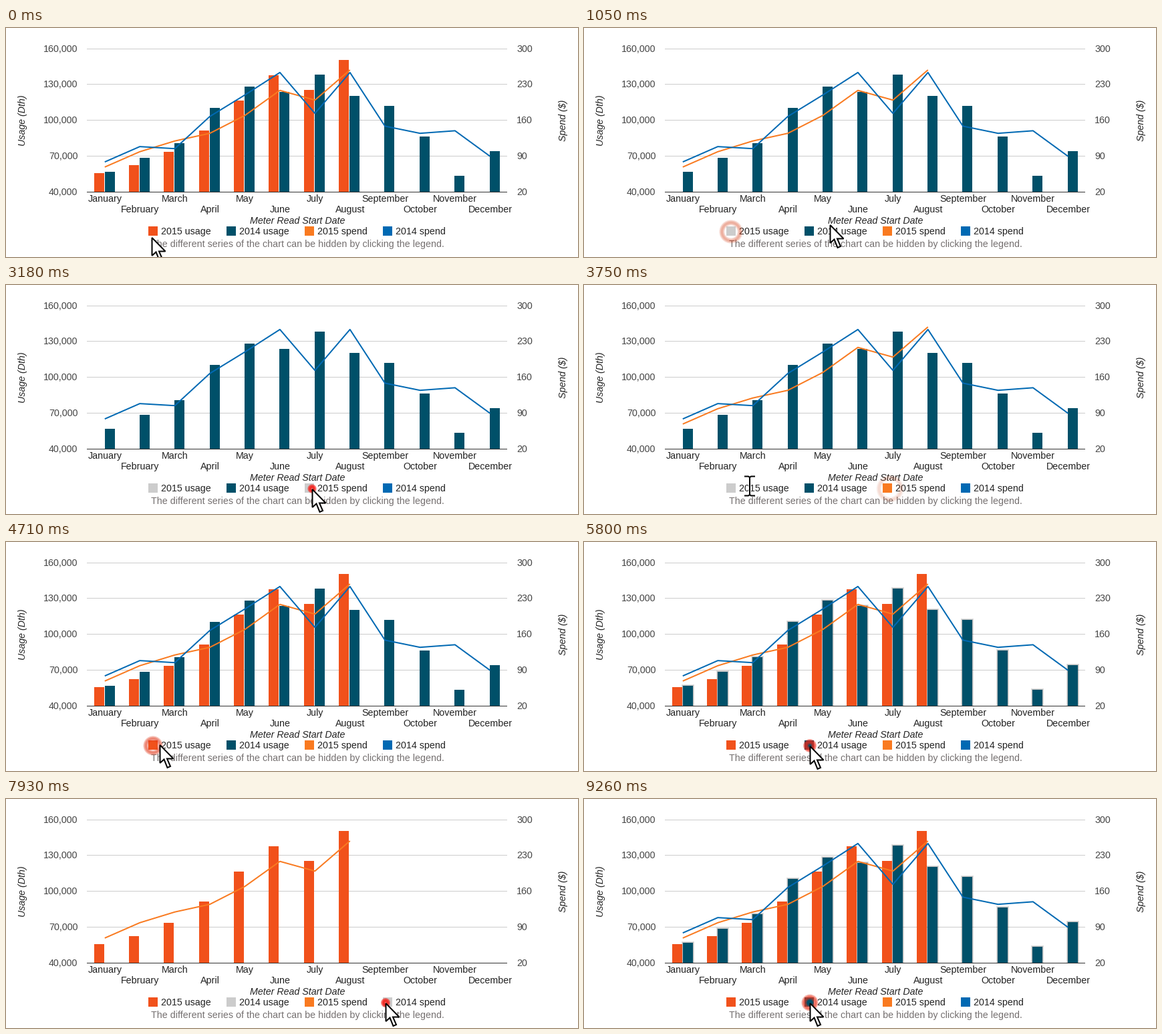
Animation, 856 px wide and 344 px high, one loop 9.29 s. Source, as a matplotlib script:

```python
import math

import matplotlib.pyplot as plt
import numpy as np
from matplotlib.animation import FuncAnimation
from matplotlib.collections import PolyCollection
from matplotlib.patches import Circle, Polygon, Rectangle

W, H, DPI = 856, 344, 64
PX = 72 / DPI                      # points per pixel
LOOP, FRAMES = 9290, 310
STEP = LOOP / FRAMES

plt.rcParams.update({
    "font.family": "Liberation Sans",
    "font.size": 14.3 * PX,
    "text.hinting": "force_autohint",
    "toolbar": "None",
})

ORANGE, TEAL, AMBER, BLUE = "#f1511b", "#005069", "#f97a20", "#0069b3"
GRAY, DARK = "#cccccc", "#222222"
LEFT, WIDTH, TOP, BASE = 121, 629, 31, 246
SLOT = WIDTH / 12
MONTHS = ("January February March April May June July August "
          "September October November December").split()

# Chart data: usage in thousand Dth, spend in dollars
USAGE_2015 = [55.6, 62.3, 73.5, 91.3, 116.5, 137.7, 125.4, 150.5]
USAGE_2014 = [56.7, 68.5, 80.7, 110.3, 128.2, 123.7,
              138.2, 120.4, 112, 86.3, 53.4, 74]
SPEND_2015 = [69, 99, 120, 135, 170, 219, 200, 259]
SPEND_2014 = [79, 109, 105, 168, 210, 254, 174, 254, 149, 135, 140, 90]

# Click time and index of the series it toggles
CLICKS = [(510, 0), (2040, 2), (3090, 2), (4290, 0),
          (5560, 1), (6660, 3), (7810, 3), (8930, 1)]
TOGGLE_DELAY, RIPPLE = 285, 720
LEAVE_DELAY, TRAVEL = 400, 500
START, AIM_X, AIM_Y = (218, 314), (220, 338, 458, 568), 306

fig = plt.figure(figsize=(W / DPI, H / DPI), dpi=DPI, facecolor="white")
ax = fig.add_axes([0, 0, 1, 1])
ax.set(xlim=(0, W), ylim=(H, 0))
ax.axis("off")


def height(value, low, high):
    return (value - low) / (high - low) * (BASE - TOP)


def label(x, y, text, ha="left", color=DARK, **kw):
    return ax.text(x, y, text, ha=ha, va="baseline", color=color, **kw)


def box(x, y, w, h, color, z):
    return ax.add_patch(Rectangle((x, y), w, h, fc=color, ec="none", zorder=z))


def bar_rects(usage, shift, grow=0):
    rects = []
    for i, value in enumerate(usage):
        x0 = math.floor(LEFT + 11 + SLOT * i - 0.05 * i) + shift - grow
        x1 = x0 + 15 + 2 * grow
        y0 = BASE - round(height(value, 40, 160)) - grow
        rects.append([(x0, BASE), (x0, y0), (x1, y0), (x1, BASE)])
    return rects


def add_bars(usage, shift, color):
    def layer(grow, fc, alpha, z):
        return ax.add_collection(PolyCollection(
            bar_rects(usage, shift, grow), facecolors=fc, edgecolors="none",
            alpha=alpha, zorder=z), autolim=False)
    glow = [layer(g, "black", 0.13, 2) for g in (2, 1)]
    return [layer(0, color, 1, 3)], glow


def add_line(spend, color, z):
    xs = LEFT + SLOT * (np.arange(len(spend)) + 0.5) + 0.6
    ys = BASE + 0.5 - height(np.array(spend), 20, 300)

    def layer(offset, width, c, alpha, order):
        line, = ax.plot(xs + offset, ys + offset, color=c, alpha=alpha,
                        lw=width * PX, solid_capstyle="butt", zorder=order,
                        scalex=False, scaley=False)
        return line
    glow = [layer(1, w, "black", 0.13, z) for w in (4, 2.5)]
    return [layer(0, 2, color, 1, z + 0.1)], glow


# Axes and captions
for i in range(5):
    y = math.floor(TOP + (BASE - TOP) * i / 4)
    last = i == 4
    box(LEFT, y, WIDTH, 1, "#333333" if last else GRAY, 6 if last else 1)
    label(107.5, y + 5, f"{160000 - 30000 * i:,}", "right", "#444444")
    label(764, y + 5, str(300 - 70 * i), color="#444444")
for i, month in enumerate(MONTHS):
    label(LEFT + SLOT * (i + 0.5) + 0.8, 261 + 16 * (i % 2), month, "center")
label(436, 294, "Meter Read Start Date", "center", style="italic")
for x, title in ((29, "Usage (Dth)"), (838, "Spend ($)")):
    label(x, 138.5, title, "center", style="italic", rotation=90,
          rotation_mode="anchor")
label(217, 329, "The different series of the chart can be hidden by "
      "clicking the legend.", color="#757070")

# Series with their legend entries
COLORS = [ORANGE, TEAL, AMBER, BLUE]
NAMES = ["2015 usage", "2014 usage", "2015 spend", "2014 spend"]
KEY_X = [213 + 117 * k for k in range(4)]
series = [add_bars(USAGE_2015, 0, ORANGE), add_bars(USAGE_2014, 16, TEAL),
          add_line(SPEND_2015, AMBER, 4), add_line(SPEND_2014, BLUE, 5)]
keys = []
for x, name, color in zip(KEY_X, NAMES, COLORS):
    keys.append(box(x, 298, 14, 14, color, 2))
    label(x + 19, 310, name)

# Click ripple and pointers
rings = [ax.add_patch(Circle((0, 0), 1, fill=False, lw=w * PX, zorder=8))
         for w in (8, 5.5, 3)]
ARROW = np.array([(0.5, 1), (0.5, 28), (6.5, 22.5), (11.5, 35), (16, 33),
                  (11, 21.5), (20.5, 21.5)])
arrow = ax.add_patch(Polygon(ARROW, fc="white", ec="black", lw=2 * PX,
                             joinstyle="miter", zorder=10))
HALF_BEAM = np.array([(7, -14.5), (2, -14.5), (0, -13),
                      (0, 13), (2, 14.5), (7, 14.5)])
BEAM = np.vstack([HALF_BEAM, [(np.nan, np.nan)], HALF_BEAM * (-1, 1)])
beam = [ax.plot([], [], color=c, lw=w * PX, zorder=10)[0]
        for c, w in (("white", 3.5), ("black", 2))]


def cursor_at(t):
    """Rest on each clicked key, then glide to the next one in a low arc."""
    x, y = START
    leave = 30
    for click, k in CLICKS:
        u = min(1, max(0, (t - leave) / TRAVEL))
        ease = 1 - (1 - u) ** 3
        dx, dy = AIM_X[k] - x, AIM_Y - y
        lift = min(12, 0.05 * abs(dx)) * math.sin(math.pi * ease)
        x, y = x + dx * ease, y + dy * ease - lift
        leave = click + LEAVE_DELAY
    return x, y


def show(artists, on):
    for artist in artists:
        artist.set_visible(on)


def draw_ripple(t):
    show(rings, False)
    for start, _ in CLICKS:
        u = (t - start) / RIPPLE
        if 0 <= u < 1:
            show(rings, True)
            alpha = 0.55 * (1 - u) ** 0.85
            color = (1 - 0.2 * u, 0.05 + 0.3 * u, 0.05 + 0.1 * u, alpha)
            for ring in rings:
                ring.set_center(cursor_at(start))
                ring.set_radius(0.5 + 17.5 * u)
                ring.set_edgecolor(color)


def update(i):
    t = i * STEP
    x, y = cursor_at(t)
    for k, (shape, glow) in enumerate(series):
        toggles = sum(s == k and t >= c + TOGGLE_DELAY for c, s in CLICKS)
        on = toggles % 2 == 0
        hover = KEY_X[k] <= x <= KEY_X[k] + 14 and 298 <= y <= 312
        show(shape, on)
        show(glow, on and hover)
        keys[k].set_facecolor(COLORS[k] if on else GRAY)
    draw_ripple(t)

    over_text = 296 <= y <= 316 and any(k + 19 <= x <= k + 94 for k in KEY_X)
    arrow.set_visible(not over_text)
    show(beam, over_text)
    spot = np.round((x, y))
    arrow.set_xy(ARROW + spot)
    for part in beam:
        part.set_data(*(BEAM + spot).T)
    return []


anim = FuncAnimation(fig, update, frames=FRAMES, interval=STEP, repeat=True,
                     repeat_delay=0, init_func=lambda: update(0))
plt.show()
```
